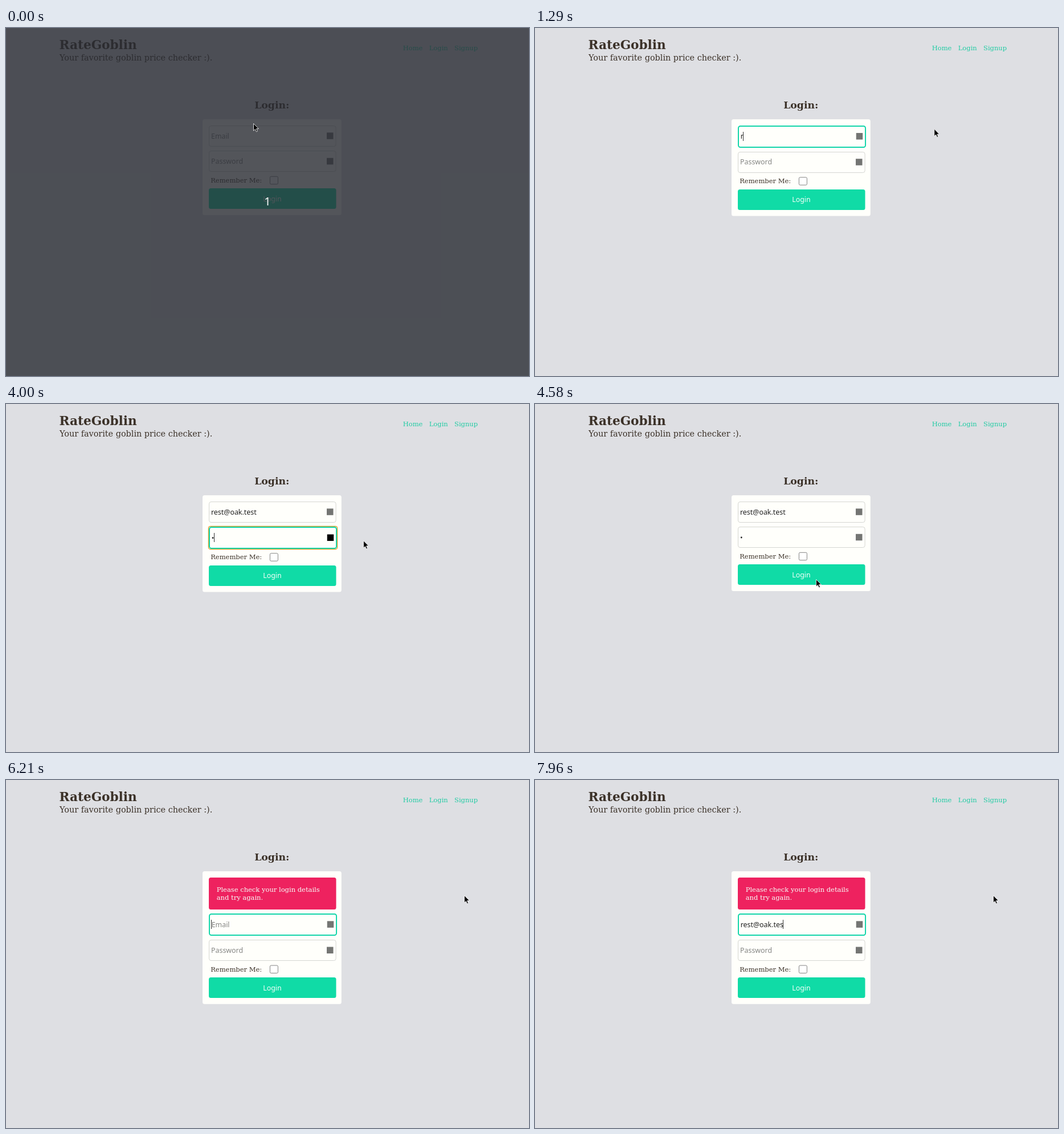
Recreate the animation shown at these times as an HTML page. Size 918 px wide and 610 px high, loop 8000 ms.

```html
<!DOCTYPE html>
<html lang="en">
<head>
<meta charset="utf-8">
<title>Login form</title>
<style>
  html, body { margin: 0; width: 100%; height: 100%; overflow: hidden; background: #dedfe3; }
  svg { display: block; font: 11.52px "DejaVu Serif", serif; fill: #3b3128; }
  .sans { font: 12.4px "Noto Sans", sans-serif; }
  .light { fill: #f6fff9; }
  .nav { fill: #23cca4; }
</style>
</head>
<body>
<svg width="918" height="610" viewBox="0 0 918 610">
  <rect width="918" height="610" fill="#dedfe3"/>
  <text x="93.5" y="37" font-size="21.6" font-weight="bold">RateGoblin</text>
  <text x="94" y="56.5" font-size="14.4">Your favorite goblin price checker :).</text>
  <g class="nav">
    <text x="696.7" y="39">Home</text>
    <text x="742.7" y="39">Login</text>
    <text x="787" y="39">Signup</text>
  </g>
  <text x="466.8" y="141" font-size="17.28" font-weight="bold" text-anchor="middle">Login:</text>
  <g id="form"></g>
  <g id="countdown">
    <rect width="918" height="610" fill="#282b32" fill-opacity=".8"/>
    <text x="459" y="311" class="sans" style="font-size:20px" fill="#fff" text-anchor="middle">1</text>
  </g>
  <path id="cursor" d="M.5 .5V13L3.4 10.4 5.4 14.8 7.5 13.9 5.5 9.6H9.4Z" fill="#000" stroke="#fff" stroke-width=".8"/>
</svg>
<script>
const LOOP = 8000, EMAIL = 'rest@oak.test', LEFT = 356, GROW = 1.44, ERROR_HEIGHT = 63.3;
const $ = id => document.getElementById(id);
const pen = document.createElement('canvas').getContext('2d');
pen.font = '12.4px "Noto Sans", sans-serif';

// One key every `interval` ms
const typed = (t, start, interval) =>
  EMAIL.slice(0, Math.max(0, Math.floor((t - start) / interval) + 1));

const moves = [
  { start: 40, end: 210, to: [440, 184] },
  { start: 420, end: 710, to: [700.3, 176.6] },
  { start: 4000, end: 4000, to: [627.5, 239] },
  { start: 4000, end: 4580, to: [493, 307] },
  { start: 5460, end: 5540, to: [540, 265] },
  { start: 5710, end: 6210, to: [804, 202] },
];

function cursorAt(t) {
  let at = [434, 167];
  for (const { start, end, to } of moves) {
    if (t < start) break;
    const k = t >= end ? 1 : (t - start) / (end - start);
    const eased = 1 - (1 - k) ** 2;
    at = at.map((v, i) => v + (to[i] - v) * eased);
  }
  return at;
}

const box = (x, y, w, h, style) => `<rect x="${x}" y="${y}" width="${w}" height="${h}" rx="3.5" ${style}/>`;

function field(y, label, value, { focus, ring, caret, icon }) {
  const grow = focus ? GROW : 0, shift = grow / 2, line = focus ? 2 : 1;
  const top = Math.round(y), width = 223.6 + grow, height = Math.round(37.2 + grow);
  const textX = 360 + shift, base = y + 22.8 + shift, secret = value === '•';
  const caretX = Math.floor(textX + (secret ? 5 : pen.measureText(value).width)) + 0.5;
  const parts = [box(LEFT + line / 2, top + line / 2, width - line, height - line,
    `fill="#fffffb" stroke="${focus ? '#13d5aa' : '#d5d6d3'}" stroke-width="${line}"`)];
  if (ring) parts.push(box(LEFT - 0.6, top - 0.6, width + 1.2, height + 1.2,
    'fill="none" stroke="#e59f2a" stroke-width="1.2"'));
  parts.push(secret
    ? `<circle cx="${textX + 2.3}" cy="${base - 4}" r="1.4" fill="#222"/>`
    : `<text class="sans" x="${textX}" y="${base}" fill="${value ? '#222' : '#858684'}">${value || label}</text>`);
  if (icon) parts.push(`<rect x="${563 + shift}" y="${y + 12.6 + shift}" width="11.5" height="11.5" fill="${ring ? '#000' : '#747573'}"/>`);
  if (focus && caret) parts.push(`<path d="M${caretX} ${top + 11}v16" stroke="#333" stroke-width="1"/>`);
  return parts.join('');
}

function form(t) {
  const failed = t >= 4920;
  const emailFocus = t >= 420 && t < 3120 || t >= 5710;
  const passwordFocus = t >= 3120 && t < 4500;
  const dy = failed ? ERROR_HEIGHT : 0;
  const low = dy + (emailFocus || passwordFocus ? GROW : 0);
  const icon = t < 4920 || t >= 5170;
  const caret = t < 7040 || t >= 7160;
  const email = failed ? typed(t, 6500, 132) : typed(t, 1290, 143);
  const password = !failed && t >= 3250 ? '•' : '';
  const error = failed ? `${box(LEFT, 171, 223.5, 56, 'fill="#ee225f"')}
    <g class="light"><text x="369.7" y="196">Please check your login details</text>
    <text x="369.7" y="209.6">and try again.</text></g>` : '';
  return `${box(345, 160, 243.8, 168 + low, 'fill="#fffffb"')}${error}
    ${field(170.7 + dy, 'Email', email, { focus: emailFocus, caret, icon })}
    ${field(215.2 + dy + (emailFocus ? GROW : 0), 'Password', password,
      { focus: passwordFocus, ring: passwordFocus, caret, icon })}
    ${box(LEFT, Math.round(281.3 + low), 223.5, 36, 'fill="#10dba6"')}
    <g transform="translate(0 ${low})">
      <text x="359.2" y="270.8">Remember Me:</text>
      <rect x="463.4" y="260.3" width="14" height="13.5" rx="2" fill="#fff" stroke="#777" stroke-width=".9"/>
      <text class="sans light" x="467.5" y="303.8" text-anchor="middle">Login</text>
    </g>`;
}

let shown = '';
function render(now) {
  const t = now % LOOP, markup = form(t);
  if (markup !== shown) $('form').innerHTML = shown = markup;
  $('countdown').style.display = t < 40 ? '' : 'none';
  $('cursor').setAttribute('transform', `translate(${cursorAt(t)})`);
}
function tick() {
  render(performance.now());
  requestAnimationFrame(tick);
}
tick();
</script>
</body>
</html>
```
